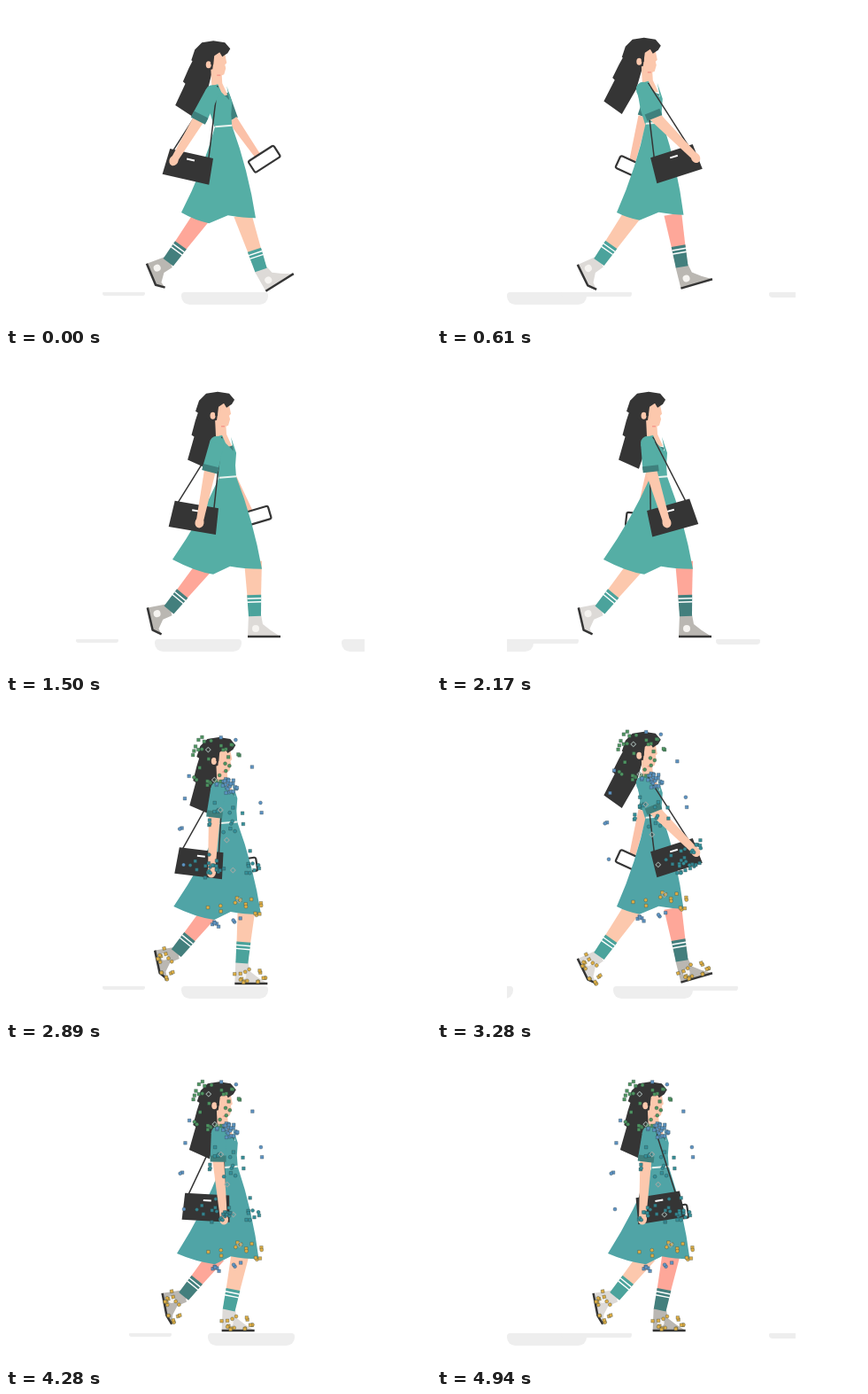
Write an HTML page with a canvas that moves like this. It is 480 px wide and 360 px high and loops after 5 s.

```html
<!DOCTYPE html>
<html lang="en">
<head>
<meta charset="utf-8">
<title>Walk cycle</title>
<style>
html, body { margin: 0; width: 100%; height: 100%; overflow: hidden; background: #fff; }
canvas { display: block; }
</style>
</head>
<body>
<canvas id="stage" width="480" height="360"></canvas>
<script>
const ctx = document.getElementById('stage').getContext('2d');
const LOOP = 5000, FRAMES = 90, CYCLE = 24, DOTS_FROM = 41;
const DARK = '#353535', SKIN = '#fcc8ad', FAR_SKIN = '#fbc1a8', CUFF = '#3f807d';
const GREEN = '#4f9560', BLUE = '#5f93c4', TEAL = '#35909a', YELLOW = '#dfae45';

// Key poses of one leg: phase, knee x, ankle x, ankle y, foot angle
const STRIDE = [
  [0, 267, 288, 298, -32], [3, 279, 281, 297, 0], [6, 257, 237, 297, 0],
  [9, 240, 204, 296, 12], [11, 221, 183, 289, 64], [15, 229, 184, 290, 77],
  [18, 243, 209, 277, 80], [21, 265, 254, 287, 15], [24, 267, 288, 298, -32]
];

const rad = deg => deg * Math.PI / 180;
const wave = (phase, peak, period) => Math.cos(2 * Math.PI * (phase - peak) / period);
const along = (a, b, t) => [a[0] + (b[0] - a[0]) * t, a[1] + (b[1] - a[1]) * t];

function seeded(seed) {
  return () => (seed = (seed * 16807) % 2147483647) / 2147483647;
}

function poly(points, fill) {
  ctx.beginPath();
  points.forEach(p => ctx.lineTo(...p));
  ctx.closePath();
  ctx.fillStyle = fill;
  ctx.fill();
}

function line(points, color, width) {
  ctx.beginPath();
  points.forEach(p => ctx.lineTo(...p));
  ctx.strokeStyle = color;
  ctx.lineWidth = width;
  ctx.stroke();
}

function oval(x, y, rx, ry, fill) {
  ctx.beginPath();
  ctx.ellipse(x, y, rx, ry, 0, 0, 7);
  ctx.fillStyle = fill;
  ctx.fill();
}

// Limb segment that narrows from width wa to wb
function taper(a, b, wa, wb, fill) {
  const len = Math.hypot(b[0] - a[0], b[1] - a[1]) || 1;
  const nx = (a[1] - b[1]) / len / 2, ny = (b[0] - a[0]) / len / 2;
  poly([[a[0] + nx * wa, a[1] + ny * wa], [b[0] + nx * wb, b[1] + ny * wb],
        [b[0] - nx * wb, b[1] - ny * wb], [a[0] - nx * wa, a[1] - ny * wa]], fill);
}

function placed(x, y, angle, draw) {
  ctx.save();
  ctx.translate(x, y);
  ctx.rotate(rad(angle));
  draw();
  ctx.restore();
}

function stride(phase) {
  const i = STRIDE.findIndex(k => k[0] > phase), a = STRIDE[i - 1], b = STRIDE[i];
  const t = (phase - a[0]) / (b[0] - a[0]);
  const [, kneeX, x, y, angle] = a.map((v, n) => v + (b[n] - v) * t);
  const bend = 60 * Math.max(0, Math.sin(Math.PI * (phase - 9) / 9));
  return { knee: [kneeX, 235], ankle: [x, y], angle, bend: rad(bend) };
}

function drawLeg({ knee, ankle, angle, bend }, skin, sock, shoe) {
  const len = Math.hypot(ankle[0] - knee[0], ankle[1] - knee[1]);
  const up = d => along(ankle, knee, d / len);
  taper(knee, ankle, 20, 13, skin);
  placed(...ankle, angle, () => {
    const tip = [18 + 11 * Math.cos(bend), 23 - 11 * Math.sin(bend)];
    poly([[-7, -2], [7, -2], [9, 9], [18, 16], tip, [18, 23], [-8, 23]], shoe);
    line([[-8, 23], [18, 23], tip], DARK, 2.5);
    oval(1, 14, 4, 4, '#f6f4f1');
  });
  taper(up(24), ankle, 16, 14, sock);
  for (const d of [20, 16]) taper(up(d + .7), up(d - .7), 16, 16, '#fff');
}

function drawShadows(frame) {
  const period = 780;
  ctx.save();
  ctx.beginPath();
  ctx.rect(79, 320, 326, 20);
  ctx.clip();
  ctx.fillStyle = '#eeeeee';
  for (const [start, width, depth] of [[109, 48, 4], [198, 98, 14], [409, 90, 14], [470, 80, 5], [705, 50, 6]]) {
    const shift = (start - 30 * frame) % period;
    for (const x of [shift, shift + period]) {
      ctx.beginPath();
      ctx.roundRect(x, 323, width, depth, [depth / 4, depth / 4, depth / 1.5, depth / 1.5]);
      ctx.fill();
    }
  }
  ctx.restore();
}

function drawHead(sway) {
  placed(225, 60, sway, () => poly([[-7, 4], [-11, 17], [-15, 33], [-12, 35], [-19, 61],
    [4, 71], [14, 40], [16, 10], [8, -8]], DARK));
  poly([[236, 74], [248, 76], [249, 92], [255, 105], [244, 108], [237, 95]], SKIN);
  poly([[236, 58], [251, 54], [254, 69], [252, 71], [253, 75], [251, 82], [246, 84], [237, 82]], SKIN);
  line([[243, 83], [247, 83]], '#f69a8d', 1.5);
  poly([[214, 66], [218, 54], [226, 46], [239, 44], [252, 46], [258, 53], [255, 58], [249, 62],
    [246, 57], [240, 61], [238, 76], [231, 78], [222, 71]], DARK);
  oval(233.5, 71, 3, 4, SKIN);
  poly([[236, 60], [239, 60], [239, 71], [236, 71]], DARK);
}

function drawDress(color, h, dx, dy, sway) {
  const left = [198 - 10 * sway, 233], right = [282 + 7 * sway, h + 200];
  const waistL = [241 + dx, 140 + dy], waistR = [260 + dx, 140 + dy];
  const midL = along(waistL, left, .5), midR = along(waistR, right, .5);
  ctx.beginPath();
  ctx.moveTo(...waistL);
  ctx.lineTo(...waistR);
  ctx.quadraticCurveTo(midR[0] + 5, midR[1] - 2, ...right);
  ctx.quadraticCurveTo(268, h + 200, 253 + dx / 2, h + 197);
  ctx.lineTo(234 + dx, h + 206);
  ctx.quadraticCurveTo(214, h + 203, ...left);
  ctx.quadraticCurveTo(midL[0] + 6, midL[1], ...waistL);
  ctx.fillStyle = color;
  ctx.fill();
  placed(dx, dy, 0, () => {
    poly([[231, 101], [236, 95], [244, 93], [248, 102], [257, 111], [254, 95], [260, 113],
      [259, 127], [260, 141], [240, 141], [235, 125]], color);
    line([[241, 141], [260, 139.5]], '#e9f3ef', 2);
  });
}

function drawPhone(center, angle) {
  placed(...center, angle, () => {
    ctx.beginPath();
    ctx.roundRect(-17, -7.5, 34, 15, 2);
    ctx.fillStyle = '#fff';
    ctx.strokeStyle = DARK;
    ctx.lineWidth = 2.2;
    ctx.fill();
    ctx.stroke();
  });
}

function drawBag(center, angle, shoulder) {
  const cos = Math.cos(rad(angle)), sin = Math.sin(rad(angle));
  for (const x of [-21, 20]) {
    const end = [center[0] + x * cos + 14 * sin, center[1] + x * sin - 14 * cos];
    line([[shoulder[0] + x / 12, shoulder[1]], end], DARK, 1.5);
  }
  placed(...center, angle, () => {
    poly([[-25, -15], [25, -15], [27, 15], [-27, 15]], DARK);
    ctx.fillStyle = '#fff';
    ctx.fillRect(-4, -9, 9, 2);
  });
}

// Scattered markers in an ellipse; inner > 0 leaves its middle empty
function cloud(count, cx, cy, rx, ry, color, inner = 0) {
  const random = seeded(count * 977 + Math.round(rx * ry));
  for (let i = 0; i < count; i++) {
    const angle = random() * 7, r = Math.sqrt(inner + (1 - inner) * random());
    const x = cx + rx * r * Math.cos(angle), y = cy + ry * r * Math.sin(angle);
    ctx.beginPath();
    if (i % 3) ctx.rect(x - 1.8, y - 1.8, 3.6, 3.6);
    else ctx.arc(x, y, 2, 0, 7);
    ctx.fillStyle = color;
    ctx.strokeStyle = 'rgba(40,60,60,.45)';
    ctx.lineWidth = .7;
    ctx.fill();
    ctx.stroke();
  }
}

function drawDots(dx, dy, hand, bag, legs) {
  placed(dx, dy, 0, () => {
    cloud(32, 234, 71, 29, 31, GREEN);
    cloud(18, 242, 150, 48, 110, BLUE, .85);
    cloud(24, 248, 99, 13, 9, '#5b93c0');
    cloud(16, 246, 135, 22, 24, TEAL);
    cloud(14, 260, 236, 34, 14, YELLOW);
    for (let i = 0; i < 6; i++) {
      placed(227 + 7 * i, 58 + 34 * i, 45, () => {
        ctx.strokeStyle = '#9aa9a5';
        ctx.lineWidth = 1;
        ctx.strokeRect(-2, -2, 4, 4);
      });
    }
  });
  cloud(8, hand[0], hand[1] - 9, 7, 14, TEAL);
  cloud(12, bag[0] + 8, bag[1] + 3, 22, 15, '#34848f');
  cloud(9, 278, 181, 12, 17, TEAL);
  for (const { ankle, angle } of legs) {
    placed(...ankle, angle, () => cloud(16, 9, 15, 18, 9, YELLOW, .3));
  }
}

function draw(frame) {
  const phase = frame % CYCLE, rigged = frame >= DOTS_FROM;
  const teal = rigged ? '#50a4a6' : '#55aea5';
  // Head height and body shift bob once per step, arms and bag once per stride
  const h = 37.5 + 6.5 * wave(phase, 2.5, 12);
  const dy = h - 44, dx = 3.5 * wave(phase, 5, 12) - 1.7;
  const arm = wave(phase, -1.5, CYCLE), lag = wave(phase, .5, CYCLE);
  const nearLeg = stride(phase), farLeg = stride((phase + 12) % CYCLE);
  const shoulder = [238 + dx, 102 + dy];
  const hand = [239 - 53 * arm, 194 - 24 * arm * arm];
  const cuff = [236 - 14 * arm + dx, 131.5 + dy];
  const bag = [239 - 33 * lag, h + 142];
  const phone = [256 + 37 * Math.tanh(2.2 * arm), 188.5 - 12 * arm * arm - 6 * arm];
  const farElbow = [246 + 12 * arm + 4 * arm * arm + dx, 133 + dy];
  const farHand = [phone[0] - 4 - 4 * arm, phone[1] - 4];

  ctx.clearRect(0, 0, 480, 360);
  ctx.lineJoin = 'round';
  drawShadows(frame);

  taper([249 + dx, 105 + dy], farElbow, 16, 13, CUFF);
  taper(farElbow, farHand, 11, 7, FAR_SKIN);
  oval(...farHand, 4, 4, FAR_SKIN);
  drawPhone(phone, -5 - 30 * arm);

  drawLeg(farLeg, '#fea799', '#437f7d', '#bab7b2');
  drawLeg(nearLeg, SKIN, '#4ba39c', '#dddad7');
  placed(dx, dy, 0, () => drawHead(6.5 - 6.5 * wave(phase, 4, 12)));
  drawDress(teal, h, dx, dy, wave(phase, 3, 12));
  drawBag(bag, -3 + 16 * lag, [242 + dx, 95 + dy]);

  taper(cuff, hand, 13, 8, SKIN);
  placed(...hand, 30 * arm, () => oval(0, 1, 5, 6, SKIN));
  oval(...shoulder, 8, 8, teal);
  taper(shoulder, cuff, 16, 18, teal);
  taper(along(shoulder, cuff, .86), along(shoulder, cuff, 1.1), 18, 18, CUFF);

  if (rigged) drawDots(dx, dy, hand, bag, [nearLeg, farLeg]);
}

function tick() {
  const time = performance.now() % LOOP;
  draw(Math.min(FRAMES - 1, Math.floor((time + 5) * FRAMES / LOOP)));
  requestAnimationFrame(tick);
}
tick();
</script>
</body>
</html>
```
